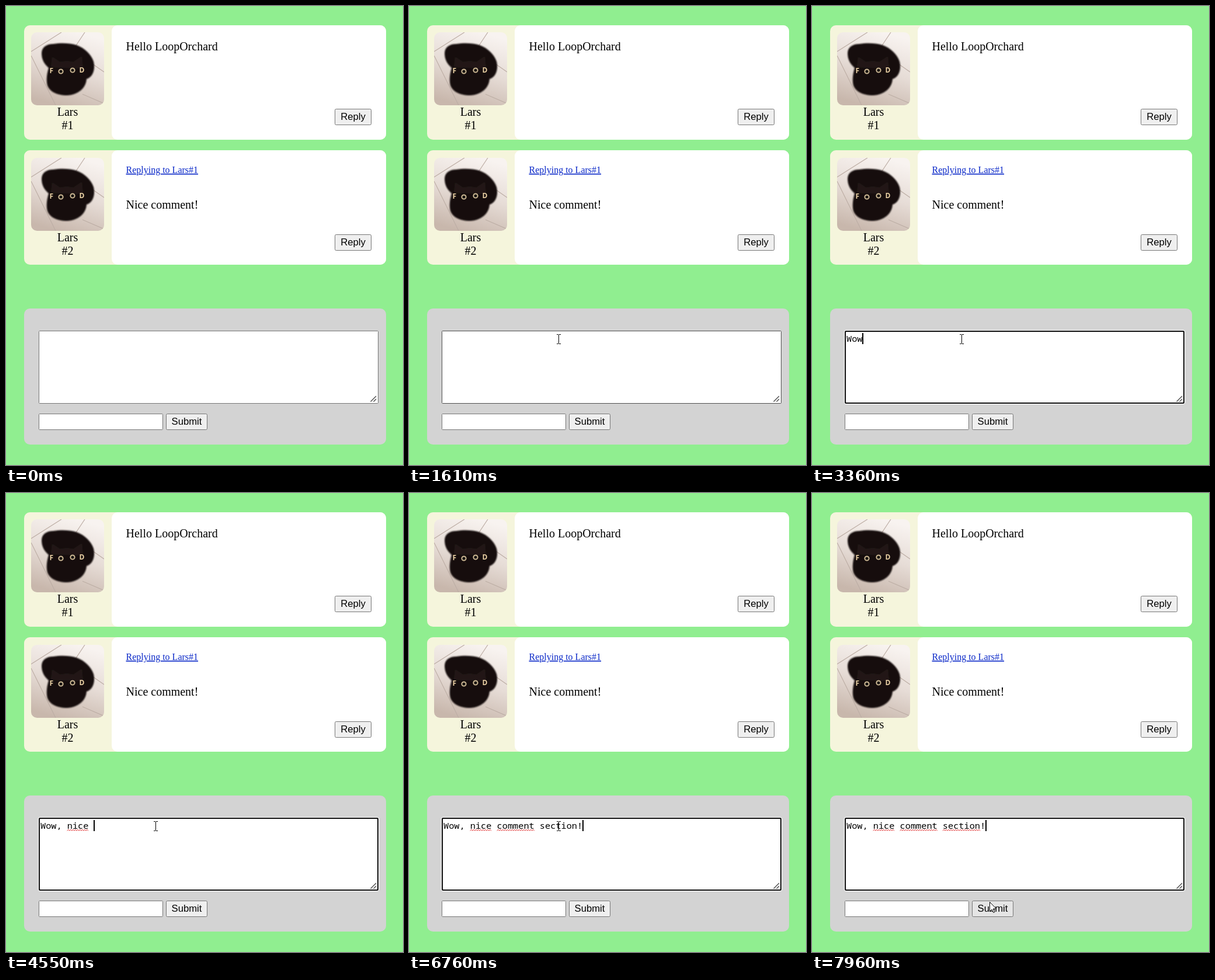
Write an HTML page that moves like this. It is 680x786 px and loops after 7.99 s.

```html
<!DOCTYPE html>
<html lang="en">
<head>
<meta charset="utf-8">
<title>Comment section</title>
<style>
  html, body { margin: 0; width: 100%; height: 100%; overflow: hidden; background: #90ee90; }
  svg { display: block; width: 100%; height: 100%; }
  text { font: 20px "Liberation Serif", serif; white-space: pre; }
  .mid { text-anchor: middle; }
  .link { font-size: 16px; fill: #0a28c8; text-decoration: underline; }
  .label { font: 16.67px "Liberation Sans", sans-serif; text-anchor: middle; }
  .mono { font: 15.28px "Noto Sans Mono", monospace; }
  .food { font: bold 12px "Open Sans", sans-serif; fill: #ecd3a6; }
  .btn { fill: #efefef; stroke: #767676; }
  .field { fill: #fff; stroke: #767676; }
</style>
</head>
<body>
<svg viewBox="0 0 680 786">
  <defs>
    <linearGradient id="floor" x1=".65" y1="0" x2=".35" y2="1">
      <stop offset="0" stop-color="#f8f3f0"/>
      <stop offset=".5" stop-color="#e6dcd6"/>
      <stop offset="1" stop-color="#c8b7ac"/>
    </linearGradient>
    <filter id="fur"><feGaussianBlur stdDeviation="1"/></filter>
    <clipPath id="round"><rect width="125" height="125" rx="10"/></clipPath>
    <g id="photo" clip-path="url(#round)">
      <rect width="125" height="125" fill="url(#floor)"/>
      <path d="M0 33L52 0M0 40L42 125M92 0L76 24M102 52L125 68M88 106L125 122" fill="none" stroke="#bdaea5" stroke-width="1.2"/>
      <g filter="url(#fur)">
        <path d="M18 36C18 26 26 20 38 20C50 18 66 18 78 22C92 27 103 38 107 50C110 62 107 76 95 80C94 96 80 107 62 108C42 108 28 100 27 86C26 76 28 68 30 61C22 54 18 46 18 36Z" fill="#17110f"/>
        <path d="M34 60L36 42L50 51C57 49 65 49 72 51L87 41L89 62" fill="#211917"/>
      </g>
      <text class="food" x="31.5" y="70">F</text>
      <text class="food" x="82.5" y="69">D</text>
      <g fill="#15100f" stroke="#cdb994" stroke-width="2">
        <circle cx="51" cy="67" r="3.6"/><circle cx="71" cy="65" r="3.6"/>
      </g>
    </g>
    <g id="card">
      <rect x="31" y="33" width="620" height="196" rx="10" fill="#f5f5dc"/>
      <rect x="181" y="33" width="470" height="196" rx="10" fill="#fff"/>
    </g>
    <g id="reply">
      <rect class="btn" x="563.5" y="176.5" width="62" height="27" rx="2"/>
      <text class="label" x="594.5" y="195">Reply</text>
    </g>
    <g id="author">
      <use href="#photo" x="43" y="45"/>
      <text class="mid" x="105.5" y="188">Lars</text>
    </g>
  </defs>

  <rect width="680" height="786" fill="#90ee90"/>

  <use href="#card"/>
  <use href="#author"/>
  <use href="#reply"/>
  <text class="mid" x="105.5" y="211">#1</text>
  <text x="205.5" y="76">Hello LoopOrchard</text>

  <use href="#card" y="214"/>
  <use href="#author" y="215"/>
  <use href="#reply" y="215"/>
  <text class="mid" x="105.5" y="426">#2</text>
  <text class="link" x="205.5" y="286">Replying to Lars#1</text>
  <text x="205.5" y="347">Nice comment!</text>

  <rect x="31" y="518" width="620" height="233" rx="10" fill="#d3d3d3"/>
  <rect id="halo" x="55" y="555" width="584" height="127" rx="3" fill="#fff"/>
  <rect id="area" class="field" x="56.5" y="556.5" width="581" height="124" rx="1"/>
  <rect id="ring" x="57" y="557" width="580" height="123" rx="2" fill="none" stroke="#101010" stroke-width="2"/>
  <path d="M624.5 677.5l9.5-9.5M629.5 677.5l4.5-4.5" stroke="#555" stroke-width="1.5"/>
  <rect class="field" x="56.5" y="698.5" width="212" height="27" rx="1"/>
  <rect id="submit" class="btn" x="274.5" y="698.5" width="70" height="27" rx="2"/>
  <text class="label" x="309.5" y="717">Submit</text>

  <text id="typed" class="mono" x="59" y="575"></text>
  <path id="waves" fill="none" stroke="#e02020"/>
  <rect id="caret" y="560" width="2" height="19"/>

  <path id="beam" d="M-3 -7.5h3m1 0h3M.5 -7v15M-3 8.5h3m1 0h3" fill="none" stroke="#000"/>
  <path id="arrow" d="M.5 .5V16.5L4.2 13L6.8 18.5L9 17.5L6.5 12H11.7Z" fill="#fff" stroke="#000"/>
</svg>
<script>
const LOOP = 7990, FOCUS = 1710, BLINK = 530, CHAR = 9.167, LEFT = 59;
const message = "Wow, nice comment section!";
const keyTimes = [2900, 3200, 3360, 3790, 3960, 4090, 4250, 4350, 4450, 4550, 4660, 4760, 4920,
  5070, 5190, 5300, 5460, 5530, 5610, 5760, 5920, 6100, 6180, 6350, 6450, 6760];
// Misspelling marks: time, first character, end character
const marks = [[4550, 5, 9], [5680, 10, 17], [7830, 18, 25]];
// Pointer route: time, x, y
const route = [[820, 676, 572], [900, 610, 552], [1000, 505, 530], [1090, 425, 520], [1190, 365, 530],
  [1330, 312, 548], [1450, 275, 562], [1600, 256, 570], [7440, 256, 570], [7600, 262, 595],
  [7750, 280, 645], [7850, 294, 682], [7960, 304, 700]];

const el = id => document.getElementById(id);
const show = (id, on) => el(id).setAttribute("visibility", on ? "visible" : "hidden");

function pointerAt(t) {
  const i = route.findIndex(p => p[0] > t);
  if (i < 0) return route.at(-1).slice(1);
  if (i === 0) return route[0].slice(1);
  const [a, b] = [route[i - 1], route[i]];
  const k = (t - a[0]) / (b[0] - a[0]);
  return [1, 2].map(n => Math.round(a[n] + (b[n] - a[n]) * k));
}

function wave(from, to) {
  let d = "";
  const end = LEFT + to * CHAR;
  for (let x = LEFT + from * CHAR, n = 0; x <= end; x += 2, n++)
    d += (n ? "L" : "M") + x.toFixed(1) + " " + (n % 2 ? 576.3 : 578.3);
  return d;
}

function draw(t) {
  const count = keyTimes.filter(k => k <= t).length;
  const last = count ? keyTimes[count - 1] : FOCUS;
  const focused = t >= FOCUS;
  el("typed").textContent = message.slice(0, count);
  el("waves").setAttribute("d", marks.filter(m => t >= m[0]).map(m => wave(m[1], m[2])).join(""));
  el("caret").setAttribute("x", Math.floor(LEFT + count * CHAR));
  show("caret", focused && (t - last) % (2 * BLINK) < BLINK);
  show("halo", focused);
  show("ring", focused);

  const [x, y] = pointerAt(t);
  const moved = t >= 820;
  const overArea = moved && x >= 56 && x < 638 && y >= 556 && y < 681;
  const overSubmit = moved && x >= 274 && x < 345 && y >= 698 && y < 726;
  el("area").style.stroke = overArea ? "#4f4f4f" : "#767676";
  el("submit").style.fill = overSubmit ? "#e5e5e5" : "#efefef";
  for (const id of ["beam", "arrow"]) el(id).setAttribute("transform", `translate(${x} ${y})`);
  show("beam", overArea);
  show("arrow", moved && !overArea);
}

const start = performance.now();
function tick() {
  draw((performance.now() - start) % LOOP);
  requestAnimationFrame(tick);
}
tick();
</script>
</body>
</html>
```
